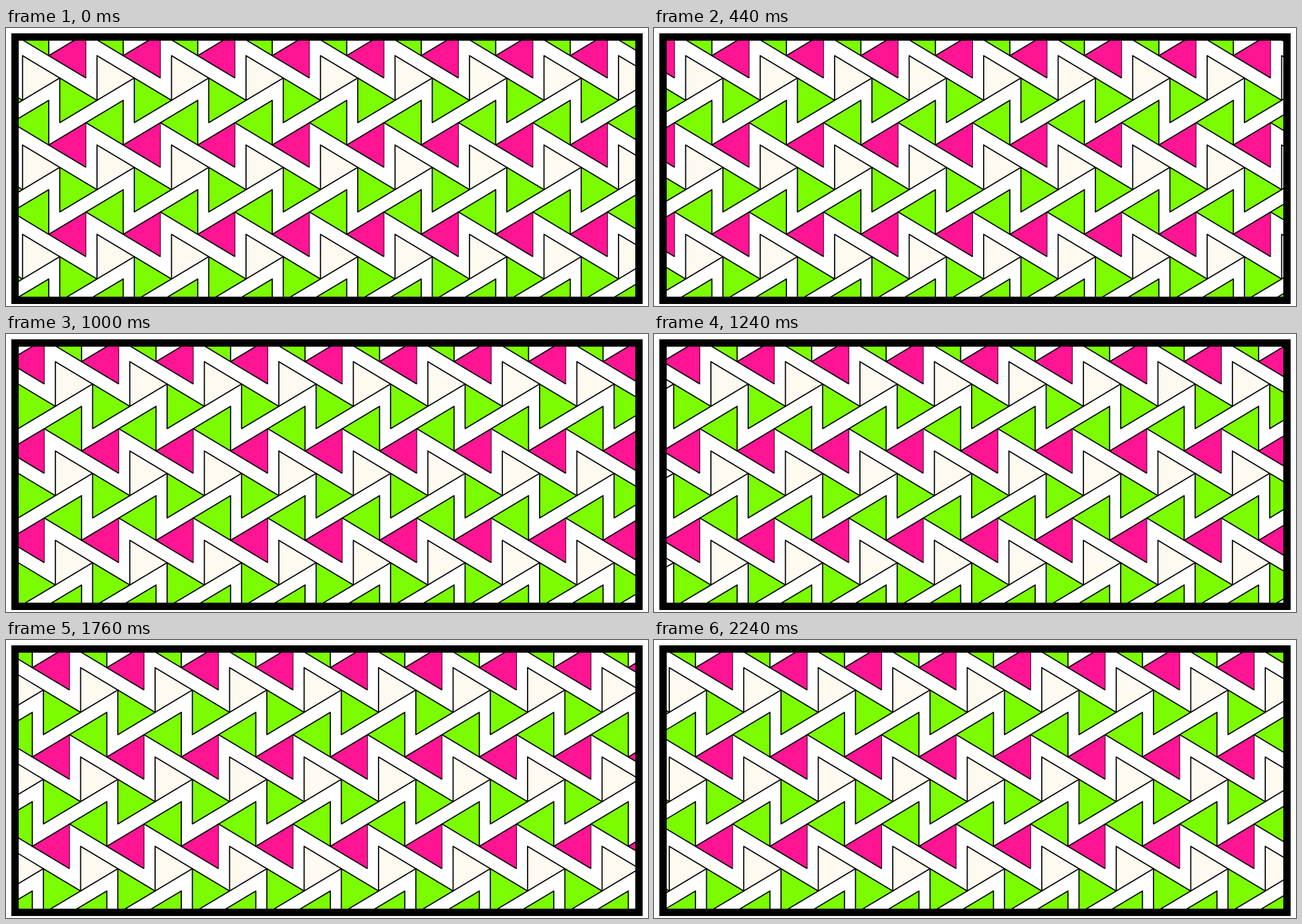
Animation, 960 px wide and 417 px high, one loop 2.28 s. Source, as an HTML page with a canvas:

```html
<!DOCTYPE html>
<html lang="en">
<head>
<meta charset="utf-8">
<title>Sliding triangles</title>
<style>
  html, body { margin: 0; width: 960px; height: 417px; overflow: hidden; background: #fff; }
  canvas { display: block; }
</style>
</head>
<body>
<canvas id="stage" width="960" height="417"></canvas>
<script>
const ctx = document.getElementById("stage").getContext("2d");

const LOOP = 2280, TICK = 40;
const STEPS = 59;              // steps per tile width
const W = 111.4, H = 134;      // tile size
const X0 = 24.7, Y0 = 41.4;
const A = W / 2, B = H / 4;    // triangle width and half height
const LEFT = 39.2;             // right side of the left-pointing green triangle
const PINK = "#ff1493", GREEN = "#7cfc00", CREAM = "#fffaf0";

// dir 1 points right, -1 points left; x is the upright side
function triangle(x, y, dir, color, thin) {
  const tip = x + dir * A;
  ctx.beginPath();
  ctx.moveTo(x, y);
  ctx.lineTo(tip, y + B);
  ctx.lineTo(x, y + 2 * B);
  if (!thin) ctx.closePath();
  ctx.fillStyle = color;
  ctx.fill();
  ctx.lineWidth = 1.7;
  ctx.stroke();
  if (thin) {
    ctx.lineWidth = 0.9;
    ctx.beginPath();
    ctx.moveTo(x, y);
    ctx.lineTo(x, y + 2 * B);
    ctx.stroke();
  }
}

function tile(x, y) {
  triangle(x + LEFT + A, y + 3 * B, -1, PINK, true);
  triangle(x, y, 1, CREAM);
  triangle(x + A, y + B, 1, GREEN);
  triangle(x + LEFT, y + 2 * B, -1, GREEN);
}

// The slide skips one step twice per loop
function offset(ms) {
  const tick = Math.floor((ms % LOOP) / TICK);
  const step = tick + (tick > 5) + (tick > 43);
  return step * W / STEPS;
}

function draw(ms) {
  ctx.fillStyle = "#fff";
  ctx.fillRect(0, 0, 960, 417);
  ctx.save();
  ctx.beginPath();
  ctx.rect(18, 18, 924, 386);
  ctx.clip();
  ctx.strokeStyle = "#000";
  ctx.lineJoin = "round";
  const dx = X0 + offset(ms);
  for (let row = -1; row < 3; row++)
    for (let col = -3; col < 9; col++)
      tile(dx + col * W, Y0 + row * H);
  ctx.restore();

  ctx.fillStyle = "#000";
  ctx.fillRect(8, 8, 944, 11);
  ctx.fillRect(8, 403, 944, 11);
  ctx.fillRect(8, 8, 11, 406);
  ctx.fillRect(941, 8, 11, 406);
}

const start = performance.now();
function loop() {
  draw(performance.now() - start);
  requestAnimationFrame(loop);
}
loop();
</script>
</body>
</html>
```
